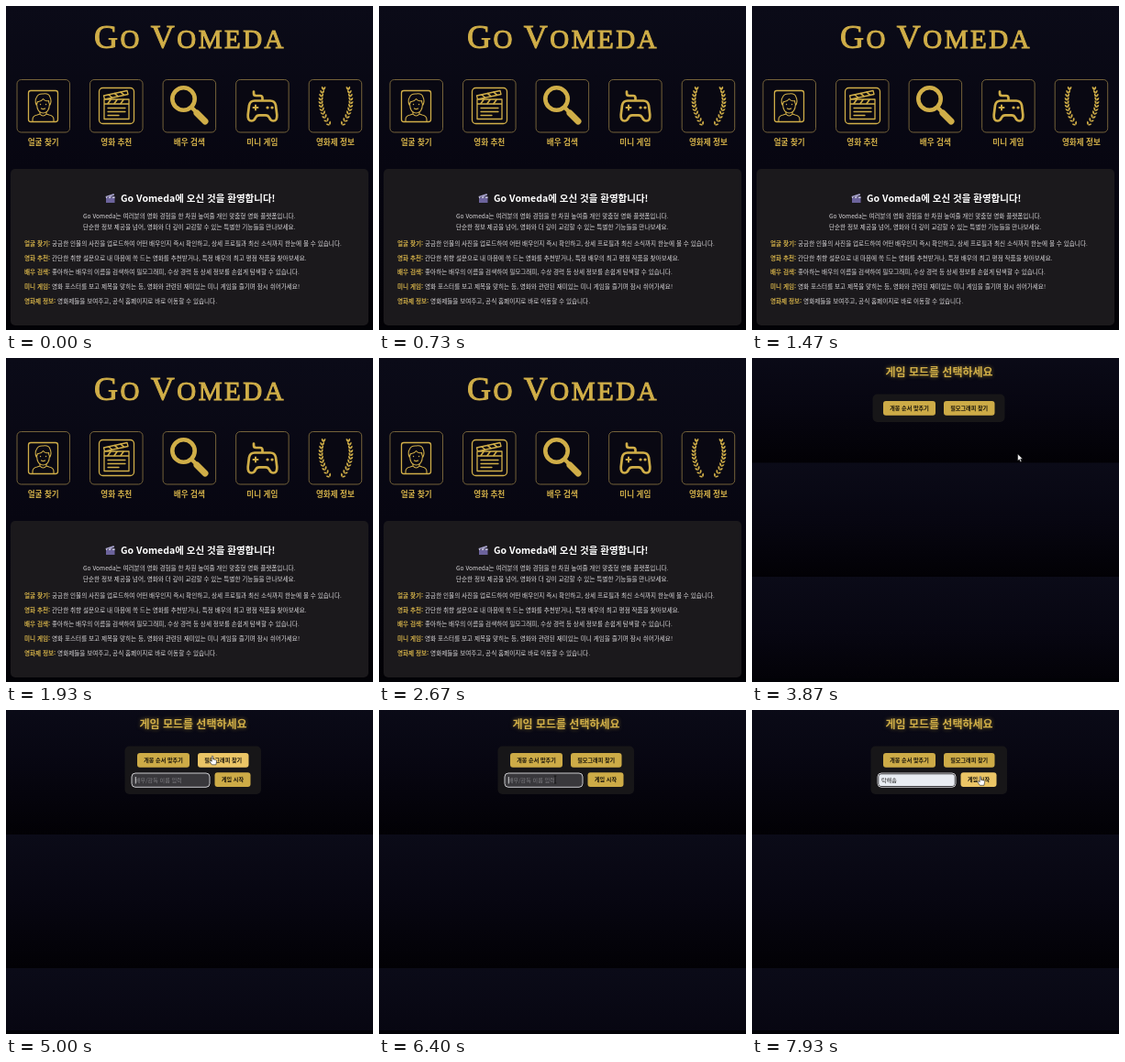
Write an HTML page that moves like this. It is 400 px wide and 354 px high and loops after 8000 ms.

```html
<!DOCTYPE html>
<html lang="ko">
<head>
<meta charset="utf-8">
<title>Go Vomeda</title>
<style>
  html, body { margin: 0; width: 100%; height: 100%; overflow: hidden; background: #04030a; }
  svg { display: block; width: 400px; height: 354px; font-family: "Noto Sans CJK KR", "Noto Sans KR", "Noto Sans CJK JP", sans-serif; }
  .gold { fill: #d0ae48; }
  .bold { font-weight: 700; }
  .mid { text-anchor: middle; }
  .line { fill: none; stroke: #d0ae48; stroke-width: 1.3; stroke-linecap: round; stroke-linejoin: round; }
  .brand { font-family: "Liberation Serif", "Noto Serif", serif; letter-spacing: 2.5px; stroke: #d0ae48; stroke-width: 1; }
  .glow { filter: drop-shadow(0 0 2px #d4af3799); }
  .button text { font-size: 6.1px; font-weight: 700; fill: #17130a; text-anchor: middle; }
</style>
</head>
<body>
<svg viewBox="0 0 400 354">
  <defs>
    <linearGradient id="night" x1="0" y1="0" x2="0" y2="1">
      <stop offset="0" stop-color="#0b0b18"/>
      <stop offset=".5" stop-color="#070611"/>
      <stop offset="1" stop-color="#020105"/>
    </linearGradient>
  </defs>
  <g id="tiles"></g>
  <rect y="350" width="400" height="4" fill="#020206"/>

  <g id="home">
    <text class="gold brand" x="96" y="46" font-size="36">G<tspan font-size="29">O </tspan>V<tspan font-size="29">OMEDA</tspan></text>
    <g id="cards"></g>

    <g class="line">
      <rect x="24.5" y="92.500" width="32" height="34" rx="2.500"/>
      <path d="M29 126v-2q0-4 5-5l3-1v-2.500M52 126v-2q0-4-5-5l-3-1v-2.500M37 118q3.500 4 7 0" stroke-width="1.100"/>
      <path d="M33.500 107q.5 10 7 10t7-10M33 108q-2-5 .5-8.500 1.500-4 7-3.500 6-1 7.500 3.500 2 4 0 8.500-1.500-2-1.500-4.500-4 1-6-2-2.500 3.500-6 3-.5 2-1.500 3.500" stroke-width="1.100"/>
      <path d="M37.500 107.500h.1M43.500 107.500h.1M38.500 112q2 1.300 4 0"/>

      <rect x="101.500" y="89.500" width="38" height="39" rx="4"/>
      <path d="M106.500 98l25.500-5.500 1 4-25.500 5.500zM107 102h27v21.500h-27zM107 107h27"/>
      <path d="M112 97l3.500 3M118.500 95.600l3.500 3M125 94.200l3.500 3M114 102.500l-3 4M121 102.500l-3 4M128 102.500l-3 4" stroke-width="1.600"/>
      <path d="M111 111.500h19M111 115.500h19M111 119.500h12"/>

      <circle cx="193.500" cy="101.500" r="12.200" stroke-width="4.600"/>
      <path d="M203 111.500l4 4" stroke-width="4.500"/>
      <path d="M208 117l9 9" stroke-width="7"/>

      <path d="M271 103.500h17q5 0 6 5l1.300 10.500q.4 6.500-3.800 6.500-3 0-4.500-3.500-1.300-2.700-4-2.700h-7q-2.700 0-4 2.700-1.500 3.500-4.500 3.500-4.200 0-3.800-6.500l1.300-10.500q1-5 6-5zM279.500 103v-2.500q0-2.500-2.500-2.500h-4.500q-2.500 0-2.500-2.500v-2" stroke-width="2.700"/>
      <path d="M272 108.500v5M269.500 111h5" stroke-width="2"/>
      <path d="M285 111h.1M290 111h.1" stroke-width="3.200"/>
    </g>
    <g id="laurel" class="gold"></g>

    <rect x="5" y="178" width="390" height="171" rx="5" fill="#1b191c"/>
    <g id="clapper">
      <path d="M108.500 208l9-3 .6 1.800-9 3z" fill="#a9a4cf"/>
      <path d="M109 208.300h9.500v6.700h-9.500z" fill="#6c639c"/>
      <path d="M109 208.300h9.500v1.700h-9.500z" fill="#c4c1da"/>
      <path d="M111 208.300h1.500l-1 1.700H110zM115 208.300h1.500l-1 1.700H114z" fill="#4b4570"/>
    </g>
    <text class="bold" x="293.500" y="213.500" text-anchor="end" font-size="10.5" fill="#fff">Go Vomeda에 오신 것을 환영합니다!</text>
    <g id="copy" font-size="6.59" fill="#dcdadd"></g>
  </g>

  <g id="game">
    <text class="gold bold mid glow" x="204" y="20.300" font-size="12">게임 모드를 선택하세요</text>
    <rect id="panel" y="39.500" rx="5" fill="#171618"/>
    <g id="buttons"></g>
    <g id="form">
      <rect id="ring" x="137" y="69" width="85" height="15.300" rx="4" fill="#39383c" stroke="#c9c9cc" stroke-width="1"/>
      <rect id="filled" x="138.200" y="70.200" width="82.600" height="12.900" rx="2.500" fill="#e8ecf2"/>
      <text id="entry" x="141" y="78.900" font-size="6.1"></text>
      <path id="caret" d="M141.300 73v7.500" stroke="#eee" stroke-width=".8"/>
    </g>
    <g id="cursor">
      <path id="arrow" d="M0 0v7.200l1.700-1.500 1.200 2.700 1.200-.5-1.200-2.700h2.300z" fill="#fff" stroke="#111" stroke-width=".4"/>
      <path id="hand" d="M-.8 0q.8-.9 1.500 0v3.300l3 .7q1 .3.900 1.500l-.7 3.800h-4.500l-2.500-3.600q0-1.200 1.200-.9l1.100 1z" fill="#fff" stroke="#222" stroke-width=".6"/>
      <path id="beam" d="M-1.300-4h2.600M0-4v8M-1.300 4h2.600" fill="none" stroke="#111" stroke-width=".8"/>
    </g>
  </g>
</svg>
<script>
const $ = id => document.getElementById(id);
const show = (id, on) => $(id).setAttribute("display", on ? "inline" : "none");
const setAll = (id, attrs) => { for (const k in attrs) $(id).setAttribute(k, attrs[k]); };

const LOOP = 8000, OPEN_GAME = 3670, OPEN_FORM = 4430, FOCUS = 4530, REFOCUS = 6150, FILL = 7150;

// Home page
$("cards").innerHTML = ["얼굴 찾기", "영화 추천", "배우 검색", "미니 게임", "영화제 정보"].map((label, i) => {
  const x = 12 + 79.55 * i;
  return `<rect x="${x}" y="80.5" width="57.5" height="57.5" rx="4.5" fill="#090812" stroke="#75633a" stroke-width="1"/>
    <text class="gold bold mid" x="${x + 28.7}" y="152.3" font-size="8.6">${label}</text>`;
}).join("");

const leaf = (x, y, angle) =>
  `<path d="M0 0q2.200-2.200 4.600 0q-2.500 1.800-4.600 0" transform="translate(${x} ${y}) rotate(${angle})"/>`;
let branch = "";
for (let i = 0; i < 11; i++) {
  const u = i / 10, v = 1 - u;
  const x = v * v * 353 + 2 * u * v * 339 + u * u * 346;
  const y = 130 - 38 * u;
  branch += leaf(x, y, -165 + 50 * u) + leaf(x, y, -85 + 25 * u);
}
$("laurel").innerHTML = `<g>${branch}</g><g transform="translate(719 0) scale(-1 1)">${branch}</g>`;

const intro = [
  "Go Vomeda는 여러분의 영화 경험을 한 차원 높여줄 개인 맞춤형 영화 플랫폼입니다.",
  "단순한 정보 제공을 넘어, 영화와 더 깊이 교감할 수 있는 특별한 기능들을 만나보세요."
];
const features = [
  ["얼굴 찾기", "궁금한 인물의 사진을 업로드하여 어떤 배우인지 즉시 확인하고, 상세 프로필과 최신 소식까지 한눈에 볼 수 있습니다."],
  ["영화 추천", "간단한 취향 설문으로 내 마음에 쏙 드는 영화를 추천받거나, 특정 배우의 최고 평점 작품을 찾아보세요."],
  ["배우 검색", "좋아하는 배우의 이름을 검색하여 필모그래피, 수상 경력 등 상세 정보를 손쉽게 탐색할 수 있습니다."],
  ["미니 게임", "영화 포스터를 보고 제목을 맞히는 등, 영화와 관련된 재미있는 미니 게임을 즐기며 잠시 쉬어가세요!"],
  ["영화제 정보", "영화제들을 보여주고, 공식 홈페이지로 바로 이동할 수 있습니다."]
];
$("copy").innerHTML =
  intro.map((s, i) => `<text class="mid" x="199.7" y="${232.3 + 11.3 * i}">${s}</text>`).join("") +
  features.map(([name, s], i) =>
    `<text x="20" y="${261.9 + 15.65 * i}"><tspan class="gold bold">${name}:</tspan> ${s}</text>`).join("");

// Game page
const buttons = [
  { id: "order", x: 143, y: 47, w: 57, label: "개봉 순서 맞추기" },
  { id: "films", x: 209, y: 47, w: 55.5, label: "필모그래피 찾기" },
  { id: "start", x: 227.5, y: 68.3, w: 39, label: "게임 시작" }
];
$("buttons").innerHTML = buttons.map(b =>
  `<g class="button" id="${b.id}"><rect x="${b.x}" y="${b.y}" width="${b.w}" height="15.700" rx="3"/>
   <text x="${b.x + b.w / 2}" y="${b.y + 10.1}">${b.label}</text></g>`).join("");

const inside = (p, x, y, w, h) => p.x >= x && p.x <= x + w && p.y >= y && p.y <= y + h;

const route = [
  [3900, 289.7, 105], [4330, 225, 50.5], [5200, 225, 50.5], [5900, 192, 76], [6500, 192, 76],
  [7050, 180, 97], [7350, 180, 97], [7650, 205, 94], [7880, 249, 73]
];
function pointerAt(t) {
  const next = route.findIndex(k => k[0] > t);
  if (next <= 0) {
    const [, x, y] = next ? route[route.length - 1] : route[0];
    return { x, y };
  }
  const [t0, x0, y0] = route[next - 1], [t1, x1, y1] = route[next];
  const u = (t - t0) / (t1 - t0), e = u * u * (3 - 2 * u);
  return { x: x0 + (x1 - x0) * e, y: y0 + (y1 - y0) * e };
}

let tileKey;
function drawTiles(top, height) {
  const key = `${top},${height}`;
  if (key === tileKey) return;
  tileKey = key;
  let out = "";
  for (let y = top; y < 350; y += height)
    out += `<rect y="${y}" width="400" height="${height}" fill="url(#night)"/>`;
  $("tiles").innerHTML = out;
}

function render(t) {
  const game = t >= OPEN_GAME, form = t >= OPEN_FORM, filled = t >= FILL;
  show("home", !game);
  show("game", game);
  if (!game) return drawTiles(0, 354);

  drawTiles(-10, form ? 146 : 124.5);
  setAll("panel", form ? { x: 129.5, width: 148.5, height: 52.5 } : { x: 131.5, width: 144, height: 30.5 });
  show("form", form);
  show("start", form);
  show("filled", filled);
  setAll("ring", { fill: filled ? "#17171a" : "#39383c" });
  $("entry").textContent = filled ? "탁해솜" : "배우/감독 이름 입력";
  setAll("entry", { fill: filled ? "#222" : "#7d7c80" });
  const blink = t - (t < REFOCUS ? FOCUS : REFOCUS);
  show("caret", !filled && blink >= 0 && blink % 1000 < 500);

  const p = pointerAt(t);
  let hovered = false;
  for (const b of buttons) {
    const on = (form || b.id !== "start") && inside(p, b.x, b.y, b.w, 15.7);
    hovered = hovered || on;
    $(b.id).firstElementChild.setAttribute("fill", on ? "#ebc566" : "#cdab47");
  }
  const typing = form && inside(p, 137, 69, 85, 15.3);
  show("hand", hovered);
  show("beam", typing);
  show("arrow", !hovered && !typing);
  setAll("cursor", { transform: `translate(${p.x} ${p.y})` });
}

const begin = performance.now();
function tick() {
  render((performance.now() - begin) % LOOP);
  requestAnimationFrame(tick);
}
tick();
</script>
</body>
</html>
```
